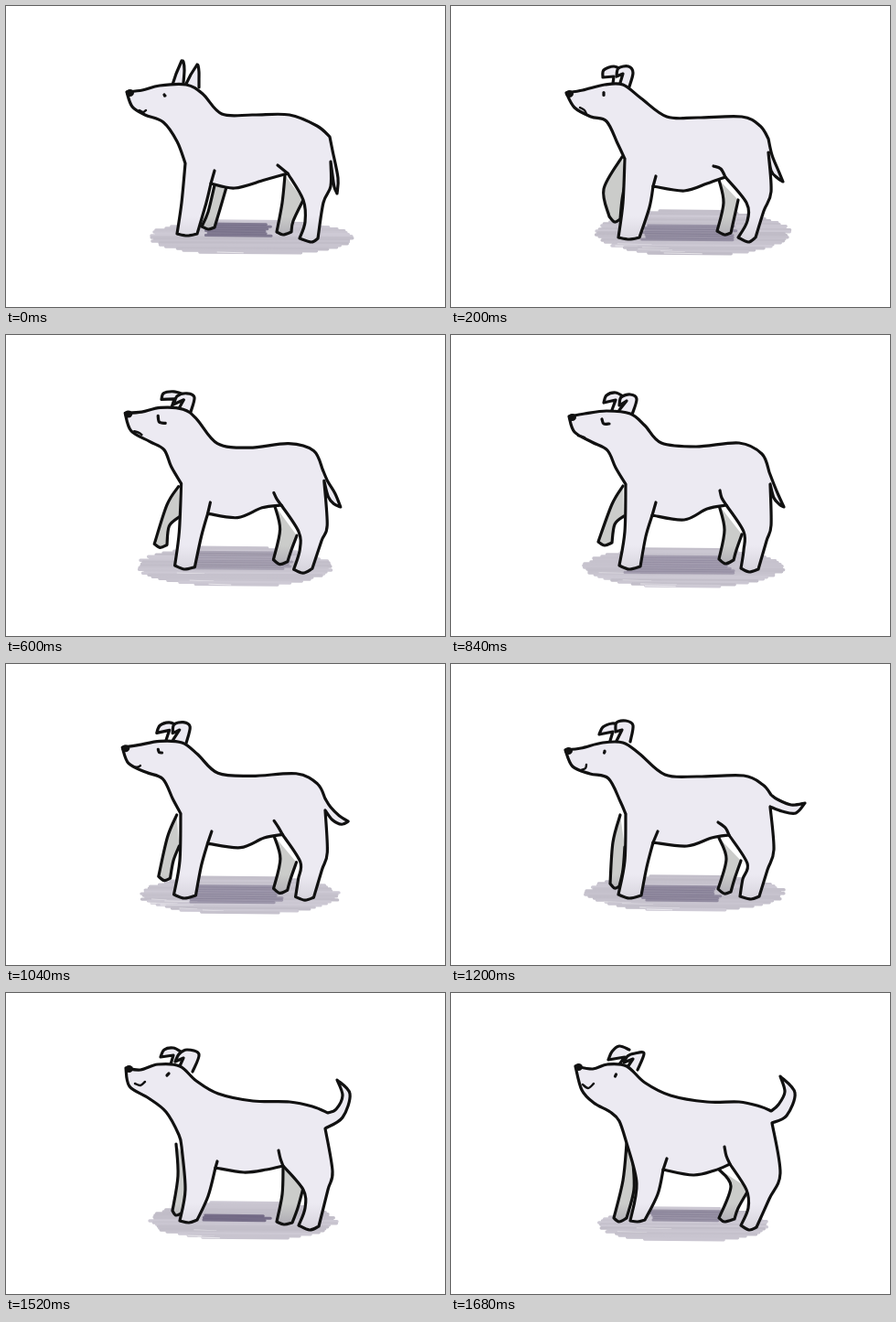
An HTML page with a canvas that plays this animation: 480 px wide and 329 px high, repeating every 1720 ms.

```html
<!DOCTYPE html>
<html lang="en">
<head>
<meta charset="utf-8">
<title>Dog</title>
<style>
html, body { margin: 0; width: 100%; height: 100%; overflow: hidden; background: #fff; }
canvas { display: block; }
</style>
</head>
<body>
<canvas id="stage" width="480" height="329"></canvas>
<script>
const ctx = document.getElementById('stage').getContext('2d');
const LOOP = 1720;
// Start of every held drawing
const HOLDS = [0, 80, 200, 320, 440, 600, 680, 760, 840, 920, 1000, 1120, 1200,
  1280, 1360, 1440, 1480, 1520, 1560, 1640, 1680];

// Points form smooth curves; a slash marks a corner.
// shade: wash box, dark streak box, streak strength.
const POSES = [
  { at: 0,
    body: '132,94 149,92 168,87 197,86 215,96 236,118 270,119 310,119 340,131 354,143 / 357,158 363,188 362,205 / 359,198 357,185 355,170 / 355,197 347,215 341,254 / 334,258 321,254 / 327,236 325,212 308,183 / 283,190 250,199 224,194 / 219,215 209,249 / 198,251 187,249 / 192,215 196,172 / 187,148 172,127 152,119 138,110 132,94',
    hind: '305,185 302,215 296,247 / 303,250 312,247 / 314,235 325,212',
    fore: '228,196 221,225 214,241 / 221,244 228,242 / 234,222 241,198',
    ear: '182,86 186,74 / 192,60 / 194,61 195,70 194,84',
    nearEar: '197,85 202,75 / 209,64 / 210,65 211,72 211,80 211,89',
    thigh: '297,174 308,183', elbow: '228,180 224,194',
    eye: '173,97 173.5,98 174,98', mouth: '146,114 150,116 153,114',
    shade: '152 233 383 272 215 236 292 254 .75' },
  { at: 200,
    body: '126,95 144,92 168,86 188,86 208,101 236,121 270,122 318,121 338,131 347,145 / 351,163 358,180 363,192 / 357,188 350,180 347,160 / 350,203 342,224 333,253 / 325,258 314,253 / 324,235 323,215 300,187 / 280,194 255,202 221,197 / 217,220 206,253 / 195,255 183,253 / 188,215 190,167 / 182,150 170,126 153,121 135,111 126,95',
    hind: '293,190 298,215 291,246 / 299,250 306,248 / 310,230 314,212',
    fore: '187,165 167,200 173,230 / 179,236 185,233 / 187,212 190,196',
    ear: '177,85 178,77 / 166,78 / 167,70 178,66 187,70',
    nearEar: '185,84 188,74 / 181,77 / 183,68 194,66 199,73 195,88',
    thigh: '287,175 295,178 300,187', elbow: '224,186 221,197',
    eye: '167,94.5 167,96 167,97.5', mouth: '141,111 146,114 148,118',
    shade: '153 222 375 273 208 238 315 258 .5' },
  { at: 440,
    body: '131,83 150,83 168,77 192,78 206,87 232,119 265,124 305,119 334,124 345,145 / 351,158 361,172 367,188 / 358,184 352,176 347,157 / 352,208 345,225 334,255 / 324,261 313,257 / 322,235 320,215 301,186 / 280,188 252,198 221,194 / 214,220 206,254 / 195,256 185,252 / 189,215 192,162 / 181,143 174,125 159,116 138,104 131,83',
    hind: '294,186 300,212 292,246 / 299,251 307,249 / 312,235 318,220',
    fore: '189,166 176,186 163,230 / 169,234 176,231 / 178,210 190,199',
    ear: '184,78 187,69 / 172,68 / 174,62 186,61 197,63',
    nearEar: '192,80 196,70 / 183,75 / 188,66 199,63 208,67 204,84',
    thigh: '292,174 296,180 301,186', elbow: '223,183 221,194',
    eye: '167,86 168,94 175,96', mouth: '141,102 147,104 150,107',
    shade: '138 229 357 274 200 232 315 254 .3' },
  { at: 840,
    body: '129,89 146,86 170,83 196,86 212,99 230,118 268,122 315,118 340,130 348,150 / 353,163 358,175 364,188 / 359,185 353,178 349,163 / 350,208 345,225 336,256 / 326,259 317,255 / 320,235 320,215 301,186 / 280,190 255,202 220,197 / 213,220 207,253 / 195,256 184,252 / 190,215 191,163 / 180,145 171,126 154,117 135,106 129,89',
    hind: '293,186 299,213 293,245 / 300,250 309,246 / 312,235 318,218',
    fore: '188,165 176,185 161,226 / 168,230 176,227 / 179,207 189,198',
    ear: '176,82 180,71 / 167,74 / 170,66 180,63 188,67',
    nearEar: '184,82 192,72 / 184,77 / 186,68 196,65 203,70 198,87',
    thigh: '294,170 296,178 301,186', elbow: '224,183 220,197',
    eye: '165,92 167,97 173,97', mouth: '139,110 143,111 146,112',
    shade: '140 232 368 276 190 240 310 262 .4' },
  { at: 1200,
    body: '125,94 142,92 166,86 188,86 206,98 234,121 270,123 320,122 341,132 350,143 / 357,148 372,154 387,152 / 377,163 362,161 349,156 / 353,203 346,225 337,254 / 328,257 316,254 / 319,235 324,218 304,187 / 285,190 258,199 221,195 / 214,222 208,253 / 195,256 183,252 / 190,215 191,164 / 185,150 172,125 152,120 133,112 125,94',
    hind: '293,190 301,213 292,246 / 299,251 306,249 / 310,235 317,215',
    fore: '185,165 177,195 174,240 / 179,245 184,243 / 188,225 190,200',
    ear: '174,84 177,74 / 162,77 / 166,69 176,65 184,66',
    nearEar: '181,84 187,72 / 180,74 / 181,64 191,62 199,67 196,85',
    thigh: '292,173 300,179 304,187', elbow: '226,183 221,195',
    eye: '168,95 168,96 167.5,97', mouth: '142,116 147,114 148,110',
    shade: '143 230 370 270 207 241 300 260 .55' },
  { at: 1520,
    body: '131,82 147,84 166,78 190,80 208,96 232,110 270,118 310,119 335,124 352,131 / 361,127 368,112 362,95 / 376,110 368,136 349,148 / 357,195 352,215 342,255 / 332,259 320,254 / 327,235 325,215 303,189 / 285,193 260,196 229,191 / 221,222 209,248 / 200,251 190,249 / 196,215 192,168 / 189,155 175,130 156,115 135,102 131,82',
    hind: '303,190 302,220 296,250 / 304,253 313,251 / 319,235 325,213',
    fore: '186,165 188,200 182,238 / 186,243 193,240 / 198,210 200,190',
    ear: '180,78 183,68 / 169,70 / 173,62 183,60 191,64',
    nearEar: '189,82 194,71 / 185,75 / 189,67 198,62 211,67 204,86',
    thigh: '298,172 300,181 303,189', elbow: '231,184 229,191',
    eye: '176,90 177,89 178,88', mouth: '141,99 147,101 152,97',
    shade: '152 227 366 270 212 241 291 251 .85' },
  { at: 1680,
    body: '136,80 155,83 171,78 192,80 212,98 240,112 280,119 315,119 338,124 350,129 / 358,122 365,108 360,91 / 376,109 367,134 351,142 / 360,197 348,225 334,256 / 326,259 317,254 / 325,235 323,215 305,187 / 288,194 265,199 232,193 / 226,220 212,248 / 204,250 196,249 / 203,208 192,164 / 184,140 174,130 156,120 143,106 136,80',
    hind: '292,192 306,211 293,246 / 299,250 310,247 / 314,235 326,214',
    fore: '192,165 188,205 178,246 / 184,250 192,246 / 200,215 199,185',
    ear: '184,78 190,70 / 172,73 / 176,64 184,58 195,62',
    nearEar: '193,81 199,72 / 189,76 / 193,69 201,66 211,66 204,84',
    thigh: '299,168 301,178 305,187', elbow: '236,181 232,193',
    eye: '179.5,91 180,90 180.5,89', mouth: '144,100 150,104 156,99',
    shade: '156 233 354 272 215 236 300 250 .5' }
];

const NUMBER = /[\d.]+/g;
const noise = n => { const x = Math.sin(n * 12.9898) * 43758.5453; return x - Math.floor(x); };

function mix(a, b, k) {
  const target = b.match(NUMBER);
  let i = 0;
  return a.replace(NUMBER, n => +(+n + (target[i++] - n) * k).toFixed(2));
}

function poseAt(time) {
  const next = POSES.findIndex(p => p.at > time);
  if (next < 0) return POSES[POSES.length - 1];
  const a = POSES[next - 1], b = POSES[next];
  const k = (time - a.at) / (b.at - a.at);
  const pose = {};
  for (const part in a) if (part !== 'at') pose[part] = mix(a[part], b[part], k);
  return pose;
}

// Catmull-Rom curve through each run of points
function trace(text) {
  const path = new Path2D();
  let last;
  for (const run of text.split('/')) {
    const pts = run.trim().split(' ').map(p => p.split(',').map(Number));
    if (last) pts.unshift(last);
    else path.moveTo(...pts[0]);
    for (let i = 0; i < pts.length - 1; i++) {
      const p = pts[i], q = pts[i + 1], before = pts[i - 1] || p, after = pts[i + 2] || q;
      path.bezierCurveTo(
        p[0] + (q[0] - before[0]) / 6, p[1] + (q[1] - before[1]) / 6,
        q[0] - (after[0] - p[0]) / 6, q[1] - (after[1] - p[1]) / 6, ...q);
    }
    last = pts[pts.length - 1];
  }
  return path;
}

function tint(top, bottom) {
  const g = ctx.createLinearGradient(0, 230, 0, 256);
  g.addColorStop(0, top);
  g.addColorStop(1, bottom);
  return g;
}
const WHITE = tint('#eceaf2', '#d8d5de');
const GREY = tint('#cbccca', '#aaa7b0');

function draw(text, fill) {
  const path = trace(text);
  if (fill) { ctx.fillStyle = fill; ctx.fill(path); }
  ctx.strokeStyle = '#111';
  ctx.lineWidth = 3.2;
  ctx.stroke(path);
}

function streak(x1, x2, y, width, color) {
  ctx.strokeStyle = color;
  ctx.lineWidth = width;
  ctx.beginPath();
  ctx.moveTo(x1, y);
  ctx.lineTo(x2, y + 0.8);
  ctx.stroke();
}

// Brushed wash under the feet
function drawShade(text, seed) {
  const [l, t, r, b, dl, dt, dr, db, strength] = text.match(NUMBER).map(Number);
  const cx = (l + r) / 2, cy = (t + b) / 2;
  for (let y = t + 2, i = seed; y < b - 1; y += 2, i += 5) {
    const half = (r - l) / 2 * Math.sqrt(1 - ((y - cy) / (b - t) * 2) ** 2);
    const shade = 192 + noise(i) * 14;
    streak(cx - half + 3 + noise(i + 1) * 8, cx + half - 3 - noise(i + 2) * 8, y, 3.4,
      `rgb(${shade},${shade - 4},${shade + 7})`);
    if (y > cy + 4 && noise(i + 3) > 0.5) {
      const x = cx - half + noise(i + 4) * half * 0.5;
      streak(x, x + 15 + noise(i + 2) * 30, y, 1, 'rgba(255,255,255,.6)');
    }
  }
  for (let y = dt + 2, i = seed + 7; y < db - 1; y += 2.5, i += 3) {
    streak(dl + noise(i) * 8, dr - noise(i + 1) * 14, y, 3, `rgba(105,96,125,${strength})`);
  }
}

function render(time) {
  const pose = poseAt(time);
  ctx.fillStyle = '#fff';
  ctx.fillRect(0, 0, 480, 329);
  ctx.lineCap = ctx.lineJoin = 'round';
  drawShade(pose.shade, time + 1);
  draw(pose.hind, GREY);
  draw(pose.fore, GREY);
  draw(pose.ear, WHITE);
  draw(pose.nearEar, WHITE);
  draw(pose.body, WHITE);
  for (const part of ['thigh', 'elbow', 'eye']) draw(pose[part]);
  ctx.lineWidth = 2.4;
  ctx.stroke(trace(pose.mouth));

  const [x, y] = pose.body.match(NUMBER).map(Number);
  ctx.fillStyle = '#111';
  ctx.beginPath();
  ctx.ellipse(x + 3.5, y + 1, 4.5, 4, 0, 0, Math.PI * 2);
  ctx.fill();
}

function tick(now) {
  const time = now % LOOP;
  render(HOLDS.filter(h => h <= time).pop());
  requestAnimationFrame(tick);
}
tick(0);
</script>
</body>
</html>
```
